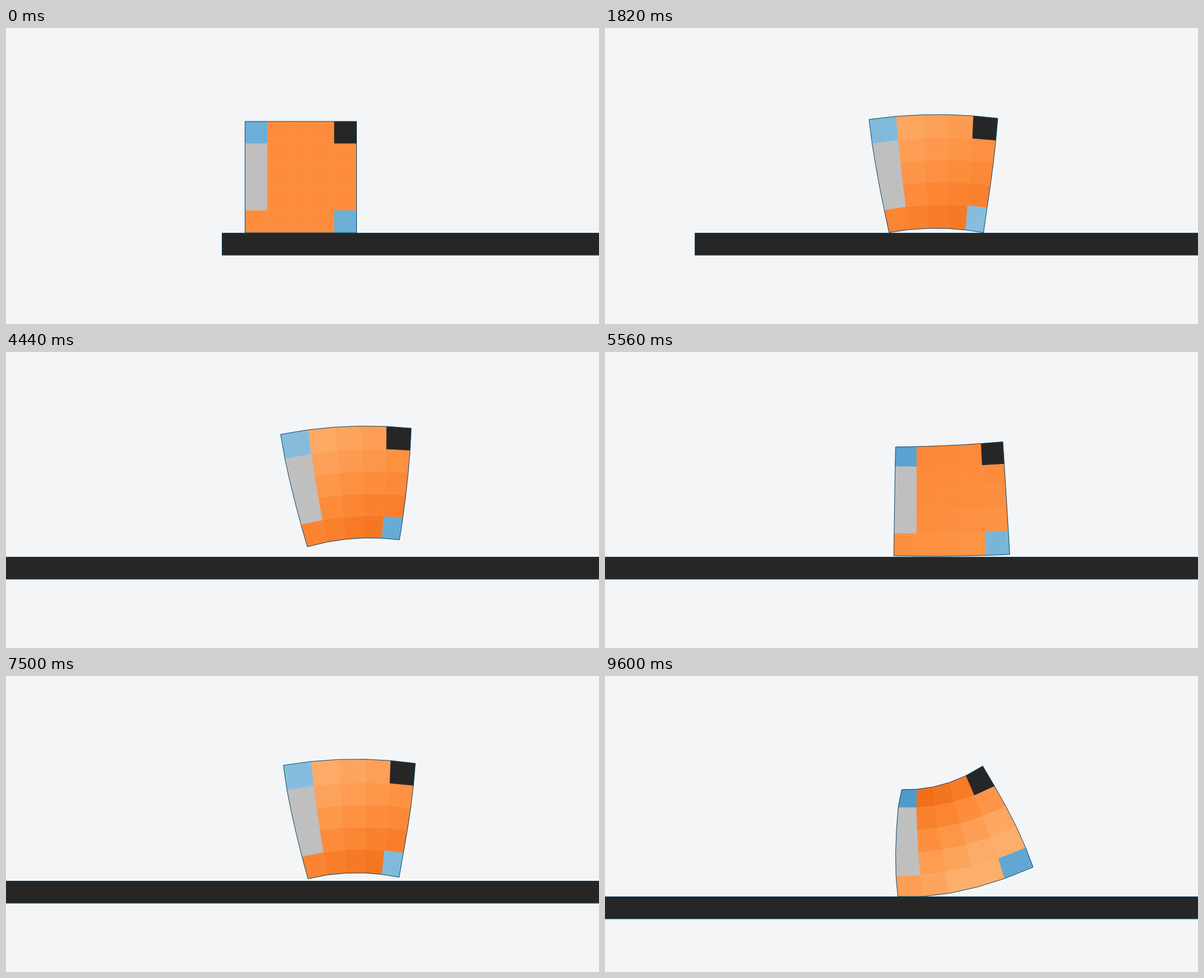
An HTML page with a canvas for the animation above (9620 ms loop, 1058 by 529 pixels).

```html
<!DOCTYPE html>
<html>
<head>
<meta charset="utf-8">
<title>Hopping soft robot</title>
<style>
html, body { margin: 0; width: 100%; height: 100%; overflow: hidden; background: #f3f5f7; }
canvas { display: block; }
</style>
</head>
<body>
<canvas id="stage" width="1058" height="529"></canvas>
<script>
const ctx = document.getElementById('stage').getContext('2d');
const LOOP = 9620, FRAME = 20, CELL = 39.8, HALF = 2.5 * CELL, FLOOR = 366;
const PAPER = '#f3f5f7', OUTLINE = '#0f4868', RIGID = '#262626', SOFT = '#bfbfbf';
const ORANGE = [[241, 105, 19], [253, 141, 60], [253, 174, 107]];
const BLUE = [[66, 146, 198], [107, 174, 214], [158, 202, 225]];

// Time and number of hops made since the first key
const PACE = [[1820, 0], [3100, 4.07], [4440, 8.17], [6660, 15.4], [8320, 20.65]];

const lerp = (a, b, k) => a + (b - a) * k;
const mix = (a, b, k) => a.map((v, i) => lerp(v, b[i], k));
const ease = (t, from, to) => {
  const k = Math.min(1, Math.max(0, (t - from) / (to - from)));
  return k * k * (3 - 2 * k);
};

// The camera lags behind the robot until both move at the same speed.
const cameraLag = t => 86 * Math.exp(-t / 1650);
const groundLeft = t => 386.5 - 47.2 * Math.log(1 + Math.exp((t - 862) / 200));
const groundDrop = t => 28 * ease(t, 9100, 9600);

function hops(t) {
  let i = 0;
  while (i < PACE.length - 2 && t > PACE[i + 1][0]) i++;
  const [[t0, n0], [t1, n1]] = PACE.slice(i);
  return lerp(n0, n1, (t - t0) / (t1 - t0));
}

// Bend, tilt, muscle stretch and centre of the body
function poseAt(t) {
  const n = hops(t), phase = n - Math.floor(n);
  const start = ease(t, 0, 300), end = ease(t, 9300, 9600);
  const wave = (mean, size, peak) =>
    start * (mean + size * Math.cos(2 * Math.PI * (phase - peak)));
  const flight = Math.max(0, Math.sin(Math.PI * (phase - 0.03) / 0.64));
  const topLeft = wave(-3, 8.5, 0.1), bottomRight = wave(-3, 8, 0.95);
  return {
    bend: wave(0, 0.38, 0.1) - 0.18 * end,
    tilt: wave(-0.061, 0.044, 0.9) - 0.17 * end,
    topLeft, bottomRight,
    x: 612 + wave(9, -4, 0) - cameraLag(t),
    y: FLOOR - HALF - start * (2.5 + 35 * flight) - (bottomRight - topLeft) / 4
      + groundDrop(t) - 16 * end
  };
}

// 6 x 6 nodes of a bent block, tilted and resting on or above the floor
function mesh({ bend, tilt, topLeft, bottomRight, x, y }, floor) {
  const cos = Math.cos(tilt), sin = Math.sin(tilt);
  const node = (i, j) => {
    const s = i / 2.5 - 1, v = j / 2.5 - 1;
    const u = s + 0.12 * bend * (1 - s * s);
    const bulge = 1 + 0.25 * bend * bend * (1 - v * v);
    const dx = HALF * u * (1 - bend * v / 2) * bulge;
    let dy = HALF * (v + bend * (u * u - 1) / 4);
    if (j === 0) dy -= topLeft * (1 - s) / 2;
    if (j === 5) dy += bottomRight * (1 + s) / 2;
    return [x + dx * cos - dy * sin, Math.min(floor, y + dx * sin + dy * cos)];
  };
  return Array.from({ length: 6 }, (_, j) =>
    Array.from({ length: 6 }, (_, i) => node(i, j)));
}

const dist = (a, b) => Math.hypot(a[0] - b[0], a[1] - b[1]);

// Short muscles are dark, stretched ones light.
function shade(ramp, size) {
  const r = size / CELL;
  const rgb = r < 1 ? mix(ramp[0], ramp[1], Math.max(0, (r - 0.75) / 0.25))
    : mix(ramp[1], ramp[2], Math.min(1, (r - 1) / 0.22));
  return `rgb(${rgb.map(Math.round)})`;
}

function cellColor(i, j, [a, b, c, d]) {
  if (i === 4 && j === 0) return RIGID;
  if (i === 0 && j > 0 && j < 4) return SOFT;
  if (i === j && i % 4 === 0) return shade(BLUE, (dist(a, d) + dist(b, c)) / 2);
  return shade(ORANGE, (dist(a, b) + dist(d, c)) / 2);
}

function trace(points) {
  ctx.beginPath();
  points.forEach(p => ctx.lineTo(...p));
  ctx.closePath();
}

function drawRobot(nodes) {
  ctx.lineWidth = 0.5;
  for (let j = 0; j < 5; j++) for (let i = 0; i < 5; i++) {
    const quad = [nodes[j][i], nodes[j][i + 1], nodes[j + 1][i + 1], nodes[j + 1][i]];
    trace(quad);
    ctx.fillStyle = ctx.strokeStyle = cellColor(i, j, quad);
    ctx.fill();
    ctx.stroke();
  }
  const inner = nodes.slice(1, 5);
  trace([
    ...nodes[0], ...inner.map(row => row[5]),
    ...nodes[5].slice().reverse(), ...inner.map(row => row[0]).reverse()
  ]);
  ctx.strokeStyle = OUTLINE;
  ctx.lineWidth = 1;
  ctx.stroke();
}

function drawGround(t) {
  const x = Math.max(-10, Math.round(groundLeft(t) - 0.5)) + 0.5;
  const y = Math.round(FLOOR + groundDrop(t)) + 0.5;
  ctx.fillStyle = RIGID;
  ctx.strokeStyle = OUTLINE;
  ctx.lineWidth = 1;
  ctx.fillRect(x, y, 1100, 39.5);
  ctx.strokeRect(x, y, 1100, 39.5);
}

function draw() {
  const t = Math.floor(performance.now() % LOOP / FRAME) * FRAME;
  ctx.fillStyle = PAPER;
  ctx.fillRect(0, 0, 1058, 529);
  drawRobot(mesh(poseAt(t), FLOOR + groundDrop(t)));
  drawGround(t);
  requestAnimationFrame(draw);
}
draw();
</script>
</body>
</html>
```
